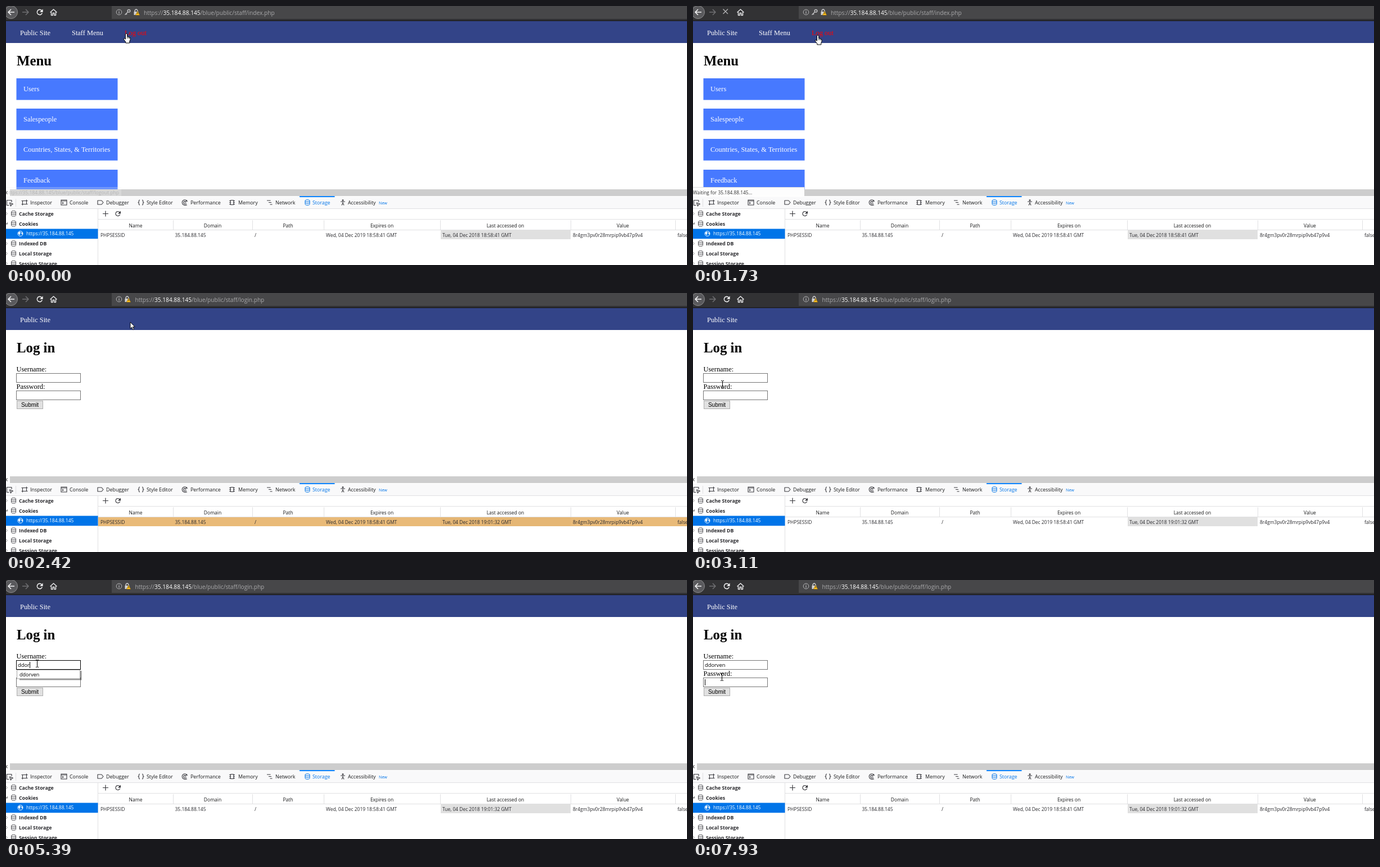
Write an HTML page with a canvas that moves like this. It is 1211 px wide and 462 px high and loops after 8 s.

```html
<!DOCTYPE html>
<html lang="en">
<head>
<meta charset="utf-8">
<title>Log out and log in</title>
<style>
html, body { margin: 0; width: 100%; height: 100%; overflow: hidden; background: #fff; }
canvas { display: block; width: 1211px; height: 462px; }
</style>
</head>
<body>
<canvas id="stage" width="1211" height="462"></canvas>
<script>
const ctx = document.getElementById('stage').getContext('2d');
const LOOP = 8000;
const UI = '"Open Sans", "Noto Sans", sans-serif';
const SERIF = '"Liberation Serif", "Times New Roman", serif';
const HOST = '35.184.88.145';
const USER = 'ddorven';
const INK = '#18191a', BLUE = '#0074e8', LINE = '#e0e0e2';

const LOADED = 2000;
const KEYS = [4860, 5040, 5210, 5390];
const PICK = 6430, FILL = 6570, REFOCUS = 7930;

// Pointer legs: start, end, number of steps, target x, target y
const LEGS = [
  [150, 580, 4, 222, 52],
  [LOADED, LOADED, 1, 221, 52],
  [2570, 3110, 5, 52, 163],
  [3230, 3530, 3, 54, 150],
  [3930, 3930, 1, 55, 149],
  [7260, 7530, 3, 48, 224],
  [7660, 7930, 3, 51, 173]
];

const within = (t, a, b) => t >= a && t < b;

function rect(x, y, w, h, color) {
  ctx.fillStyle = color;
  ctx.fillRect(x, y, w, h);
}

function frame(x, y, w, h, fill, border) {
  rect(x, y, w, h, border);
  rect(x + 1, y + 1, w - 2, h - 2, fill);
}

function text(str, x, y, size, color, font = UI, weight = 400, align = 'left') {
  ctx.font = `${weight} ${size}px ${font}`;
  ctx.textAlign = align;
  ctx.fillStyle = color;
  ctx.fillText(str, x, y);
}

function path(d, x, y, stroke, width = 1, fill) {
  ctx.save();
  ctx.translate(x, y);
  const p = new Path2D(d);
  if (fill) { ctx.fillStyle = fill; ctx.fill(p); }
  if (stroke) {
    ctx.strokeStyle = stroke;
    ctx.lineWidth = width;
    ctx.lineJoin = 'round';
    ctx.stroke(p);
  }
  ctx.restore();
}

function ring(x, y, r, stroke, width = 1, fill) {
  ctx.beginPath();
  ctx.arc(x, y, r, 0, Math.PI * 2);
  if (fill) { ctx.fillStyle = fill; ctx.fill(); }
  ctx.strokeStyle = stroke;
  ctx.lineWidth = width;
  ctx.stroke();
}

function reload(x, y, r, color, width) {
  ctx.beginPath();
  ctx.arc(x, y, r, -0.5, Math.PI * 1.75 - 1.2, false);
  ctx.arc(x, y, r, Math.PI * 1.75 - 1.2, -0.75 + Math.PI * 2, false);
  ctx.strokeStyle = color;
  ctx.lineWidth = width;
  ctx.beginPath();
  ctx.arc(x, y, r, 0.35, Math.PI * 2 - 0.7);
  ctx.stroke();
  path(`M${r + 1} ${-r - 1}V0H0Z`, x, y, null, 0, color);
}

function drawToolbar(t) {
  const loggedOut = t >= LOADED;
  rect(0, 0, 1211, 27, '#323234');
  rect(188, 0, 1023, 23, '#474749');
  rect(0, 25.5, 1211, 1.5, '#1d1d20');
  ring(9, 11, 11.5, '#8b8b8d', 1, '#5a5a5d');
  path('M6 0H-5M0 -5L-5 0L0 5', 9, 11, '#f4f4f5', 1.6);
  path('M-6 0H5M0 -5L5 0L0 5', 35, 11, '#707073', 1.5);

  if (within(t, 1430, LOADED)) {
    path('M-4.5 -4.5L4 4' + (t >= 1730 ? 'M4 -4.5L-4.5 4' : ''), 58, 10, '#b5b5b7', 1.3);
  } else {
    reload(60, 11, 4.6, within(t, LOADED, 2420) ? '#77777a' : '#eeeeef', 1.6);
  }
  path('M-6 0.5L0 -5L6 0.5M-4 0V5.5H-1.3V1.5H1.3V5.5H4V0', 84.5, 11, '#eeeeef', 1.4);

  ring(201, 11, 4.8, '#b4b4b6', 1);
  rect(200.4, 10, 1.2, 4, '#b4b4b6');
  rect(200.4, 8, 1.2, 1.2, '#b4b4b6');
  const lockX = loggedOut ? 216 : 232;
  if (!loggedOut) {
    ring(218.5, 8.7, 2.3, '#c4c4c6', 1.5);
    path('M0 0L-5.5 5.5M-3.5 3.5L-2 5', 217, 10.3, '#c4c4c6', 1.5);
  }
  path('M-2.5 -1V-3Q0 -7 2.5 -3V-1', lockX - 0.5, 11, '#d2d2d4', 1.4);
  rect(lockX - 4.5, 10, 8, 6, '#d2d2d4');
  path('M0 -4L4 3.5H-4Z', lockX + 2, 13, '#5b4410', 0.5, '#ffbf1f');
  rect(lockX + 1.5, 11.5, 1, 2.5, '#3b3000');

  const x = loggedOut ? 229.5 : 245;
  const page = loggedOut ? 'login' : 'index';
  const size = 10.15;
  let at = x;
  [['https://', '#a9a9ab'], [HOST, '#ffffff'], [`/blue/public/staff/${page}.php`, '#a9a9ab']].forEach(([s, c]) => {
    text(s, at, 15.5, size, c);
    at += ctx.measureText(s).width;
  });
}

function drawNav(t) {
  rect(0, 27, 1211, 39, '#334488');
  text('Public Site', 25, 52, 12.4, '#fff', SERIF);
  if (t < LOADED) {
    text('Staff Menu', 117, 52, 12.4, '#fff', SERIF);
    text('Log out', 211, 52, 12.4, '#ff0000', SERIF);
  }
}

function drawMenu() {
  text('Menu', 19, 105.5, 24.8, '#000', SERIF, 700);
  ['Users', 'Salespeople', 'Countries, States, & Territories', 'Feedback'].forEach((label, i) => {
    const y = Math.round(128.7 + i * 54.3);
    rect(18.5, y, 180, 38.6, '#4779ff');
    text(label, 31, y + 23, 12.4, '#fff', SERIF);
  });
}

function caret(x, y) {
  rect(Math.round(x), y, 1, 11, '#000');
}

function drawPopup(typed, picked) {
  const names = typed.length === 1 ? [USER, 'demo', 'desk'] : [USER];
  const h = names.length * 15.5 + 1;
  rect(24, 162, 110.5, h, 'rgba(0,0,0,0.42)');
  frame(19, 160, 113, h, '#fff', '#a8a8a8');
  names.forEach((name, i) => {
    const y = 160 + i * 15.5;
    const on = picked && i === 0;
    if (on) rect(19, y, 112, 16, '#0078d7');
    text(name, 24, y + 11.5, 9, on ? '#fff' : '#000', UI, on ? 600 : 400);
  });
}

function drawLogin(t) {
  text('Log in', 19, 105.5, 24.8, '#000', SERIF, 700);
  text('Username:', 18.5, 139.5, 12.4, '#000', SERIF);
  text('Password:', 18.5, 170.5, 12.4, '#000', SERIF);
  const focus = within(t, 3650, REFOCUS);
  frame(18, 143, 115, 17, '#fff', focus ? '#000' : '#757575');
  frame(18, 174, 115, 17, '#fff', '#757575');
  frame(19, 192, 47, 15, '#e1e1e1', '#adadad');
  text('Submit', 42.5, 203, 10, '#000', '"Liberation Sans", Arial, sans-serif', 400, 'center');

  const count = KEYS.filter(k => t >= k).length;
  const value = t >= FILL ? USER : USER.slice(0, count);
  text(value, 21, 155, 9.3, '#000');
  const end = 21 + ctx.measureText(value).width;
  if (within(t, 3650, 4060) || within(t, 4610, 5690) || within(t, 6130, 7260)) caret(end, 146);
  if (t >= REFOCUS) caret(21, 177);
  if (within(t, KEYS[0], FILL)) drawPopup(value, t >= PICK);
}

function drawStatus(t) {
  rect(0, 327, 1211, 13, '#fff');
  rect(7, 327, 1204, 12, '#cdcdcd');
  path('M2 -2.5L-0.5 0L2 2.5', 0.5, 333, '#555', 1.2);
  if (t >= LOADED) return;
  const waiting = t >= 1430;
  ctx.globalAlpha = t < 150 ? 0.2 : 1;
  const w = waiting ? 198 : 205;
  rect(0, 323, w, 16, '#fdfdfd');
  rect(0, 323, w, 0.6, '#c8c8c8');
  text(waiting ? `Waiting for ${HOST}...` : `https://${HOST}/blue/public/staff/logout.php`,
    0, 335.5, waiting ? 8.3 : 8.6, '#333');
  ctx.globalAlpha = 1;
}

function disks(x, y, color) {
  path('M-4 -3C-4 -5.4 4 -5.4 4 -3C4 -0.8 -4 -0.8 -4 -3V3C-4 5.4 4 5.4 4 3V-3M-4 0C-4 2.2 4 2.2 4 0', x, y, color, 1);
}

function drawTabs() {
  rect(0, 340, 1211, 122, '#fff');
  rect(0, 340, 1211, 21, '#f9f9fa');
  rect(0, 361, 1211, 1, LINE);
  rect(522, 339, 62.5, 2, '#0a84ff');
  path('M3.5 -1V-4.5H-5V4.5H-1M0 0L6 2.2L3.2 3.2L2 6Z', 6.5, 351, '#38383d', 1.1);
  rect(17, 344, 1, 14, LINE);

  const icons = [
    ['Inspector', 33, 43, 'M-3.5 -3H3.5V3H-3.5ZM-5.5 -3H-3.5M3.5 -3H5.5M-5.5 3H-3.5M3.5 3H5.5M-3.5 3V5M3.5 -3V-5'],
    ['Console', 103, 113, 'M-5 -4.5H5V4.5H-5ZM-5 -2.7H5M-3 -0.5L-1 1L-3 2.5'],
    ['Debugger', 168, 178, 'M-5 -3.5H2L5 0L2 3.5H-5Z'],
    ['Style Editor', 240, 250, 'M-2 -4.5Q-3.6 -4.5 -3.6 -2.5Q-3.6 0 -5 0Q-3.6 0 -3.6 2.5Q-3.6 4.5 -2 4.5M2 -4.5Q3.6 -4.5 3.6 -2.5Q3.6 0 5 0Q3.6 0 3.6 2.5Q3.6 4.5 2 4.5'],
    ['Performance', 318, 328, 'M3 3.8A4.8 4.8 0 1 1 4.5 -1.5M2.5 0.5A2.4 2.4 0 1 1 0.5 -2.3M0 0L4 -4M-3 4.5H4'],
    ['Memory', 402, 413, 'M-2.7 -4H2.7V4H-2.7ZM-5 -3H-3M-5 0H-3M-5 3H-3M3 -3H5M3 0H5M3 3H5'],
    ['Network', 468.5, 479, 'M-4.5 -3.5H2M-1.5 0H3.5M1 3.5H5'],
    ['Storage', 536, 545, ''],
    ['Accessibility', 599, 608, 'M-4 -1.5H4M0 -1.5V1.5M0 1L-2 5M0 1L2 5M-1 -4A1 1 0 1 1 1 -4A1 1 0 1 1 -1 -4']
  ];
  icons.forEach(([label, ix, tx, d]) => {
    const on = !d;
    if (on) disks(ix, 350.5, BLUE);
    else path(d, ix, 350.5, '#38383d', 1.1);
    text(label, tx, 354.3, 8.9, on ? BLUE : INK);
  });
  text('New', 663, 354.3, 7.2, BLUE);
}

function drawTree() {
  rect(163, 362, 1, 100, LINE);
  rect(0, 397.5, 163.5, 17.7, BLUE);
  ['Cache Storage', 'Cookies', '', 'Indexed DB', 'Local Storage', 'Session Storage'].forEach((label, i) => {
    if (!label) return;
    const y = 370.3 + i * 17.8;
    const open = label === 'Cookies';
    path(open ? 'M-1 1.5H3V-2.5Z' : 'M0 -2.5L2.5 0L0 2.5', 0, y, open ? null : '#999', 1, open ? '#888' : undefined);
    disks(13.5, y, '#4a4a4f');
    text(label, 23, y + 3.4, 8.75, '#2a2a2e', UI, 700);
  });
  ring(25.5, 406, 4.5, '#fff', 1);
  path('M-4 -1.5L-1 -3.5L1 -1L-1 0L0 3L-2.5 1.5ZM2 -3L4 -1V2L2 0.5Z', 25.5, 406, null, 0, '#fff');
  text(`https://${HOST}`, 36, 409.3, 8.5, '#fff');
}

// Row highlight grows with each repaint, then clears at once
function flashAmount(t) {
  if (!within(t, 2150, 2570)) return 0;
  return t < 2270 ? 0.2 : t < 2420 ? 0.48 : 0.87;
}

function drawTable(t) {
  path('M-5 0H5M0 -5V5', 177, 370.5, '#38383d', 1.2);
  reload(199, 370.5, 4, '#38383d', 1.2);
  rect(164, 380, 1047, 1, LINE);
  rect(164, 399, 1047, 1, LINE);
  const clock = t < LOADED ? '18:58:41' : '19:01:32';
  const columns = [
    ['Name', 164, 297, 'PHPSESSID', 168],
    ['Domain', 297, 438, HOST, 300.5],
    ['Path', 438, 565, '/', 442],
    ['Expires on', 565, 772, 'Wed, 04 Dec 2019 18:58:41 GMT', 569],
    ['Last accessed on', 772, 1004, `Tue, 04 Dec 2018 ${clock} GMT`, 776],
    ['Value', 1004, 1190, '8r4gm3pv0r28mrpip9vb47p9v4', 1008],
    ['', 1190, 1400, 'false', 1194]
  ];
  rect(773, 400, 231, 16, '#e0e0e0');
  const flash = flashAmount(t);
  if (flash) rect(164, 400, 1047, 16, `rgba(230,176,100,${flash})`);
  columns.forEach(([head, left, right, value, x]) => {
    text(head, (left + right) / 2, 394.5, 8.5, INK, UI, 400, 'center');
    rect(right, 382, 1, 17, LINE);
    text(value, x, 411.5, 8.45, '#2a2a2e');
  });
}

function pointerAt(t) {
  let x = 214, y = 49;
  for (const [a, b, n, toX, toY] of LEGS) {
    if (t < a) break;
    const done = b > a ? Math.floor((t - a) / (b - a) * (n - 1) + 0.001) + 1 : n;
    const k = Math.min(1, done / n);
    x += (toX - x) * k;
    y += (toY - y) * k;
  }
  return [x, y];
}

function drawPointer(t) {
  const [x, y] = pointerAt(t);
  const overText = x > 18 && x < 133 && y > 142 && y < 191;
  if (t < LOADED) {
    path('M-1.6 1Q0 -1 1.6 1V5.5L5.6 6.6Q7.6 7.4 7.2 10.5L5.8 14V17H-1.2V15L-4.6 10.6Q-5.4 8.4 -3.2 8.8L-1.6 10.2Z', x, y, '#000', 1, '#fff');
    path('M1.6 6V9M3.7 6.5V9M5.6 7V9.5', x, y, '#000', 0.7);
  } else if (overText) {
    path('M-2.5 -6.5H-0.8L0 -5.8L0.8 -6.5H2.5M0 -6V6M-2.5 6.5H-0.8L0 5.8L0.8 6.5H2.5', Math.round(x) + 0.5, Math.round(y), '#000', 1);
  } else {
    path('M0 0V11.5L2.7 9L4.6 13.5L6.5 12.7L4.6 8.4H8.2Z', x, y, '#000', 0.9, '#fff');
  }
}

function draw(t) {
  rect(0, 0, 1211, 462, '#fff');
  drawNav(t);
  if (t < LOADED) drawMenu();
  else drawLogin(t);
  drawToolbar(t);
  drawStatus(t);
  drawTabs();
  drawTree();
  drawTable(t);
  drawPointer(t);
}

const start = performance.now();
function tick() {
  draw((performance.now() - start) % LOOP);
  requestAnimationFrame(tick);
}
tick();
</script>
</body>
</html>
```
